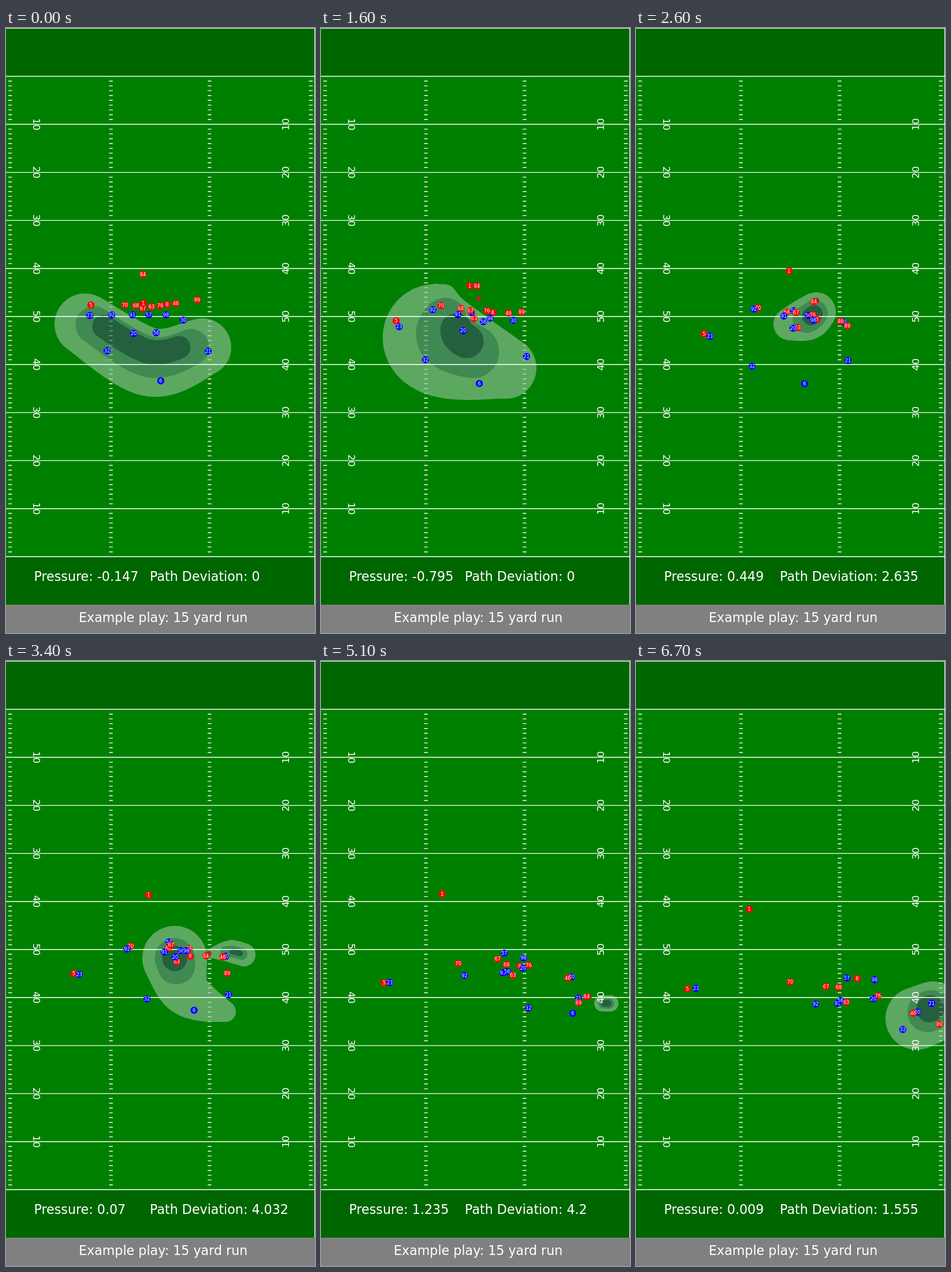
An HTML page that plays this animation: 535x1046 px, repeating every 6.8 s.

```html
<!DOCTYPE html>
<html lang="en">
<head>
<meta charset="utf-8">
<title>Example play</title>
<style>
  html, body { margin: 0; width: 100%; height: 100%; overflow: hidden; background: #006600; }
  svg { display: block; width: 100%; height: 100%; }
  text { font-family: "DejaVu Sans", sans-serif; fill: #fff; white-space: pre; }
  .caption { font-size: 22.2px; }
  .yards { font-size: 16.67px; text-anchor: middle; }
  .label { font-size: 8.33px; text-anchor: middle; }
</style>
</head>
<body>
<svg id="stage" viewBox="0 0 535 1046"></svg>
<script>
const LOOP = 6800, STEP = 100;
const RED = '#f00', BLUE = '#00f', WHITE = '#fff';
const stage = document.getElementById('stage');

function el(tag, attrs, parent = stage, text) {
  const node = document.createElementNS('http://www.w3.org/2000/svg', tag);
  for (const key in attrs) node.setAttribute(key, attrs[key]);
  if (text !== undefined) node.textContent = text;
  parent.appendChild(node);
  return node;
}
const rect = (y, height, fill) => el('rect', { x: 0, y, width: 535, height, fill });
const strokes = (d, width = 1.4) => el('path', { d, stroke: WHITE, 'stroke-width': width, fill: 'none' });
const caption = (x, y, text) => el('text', { class: 'caption', x, y }, stage, text);

// Field
const yardY = (yard) => 83.5 + 8.305 * yard;
rect(0, 997, '#006600');
rect(yardY(0), yardY(100) - yardY(0), '#008000');
rect(997, 49, '#808080');

let hashes = '', lines = '';
for (let yard = 0; yard <= 100; yard++) {
  if (yard % 10 === 0) lines += `M0 ${yardY(yard)}H535`;
  else for (const x of [4, 178.5, 349.3, 524.5]) hashes += `M${x} ${yardY(yard)}h6.3`;
}
strokes(hashes);
const density = el('g', { opacity: 0.6 });
strokes(lines);
strokes('M0 .5H534.5V997', 1);

for (let yard = 10; yard < 100; yard += 10) {
  const y = yardY(yard), value = Math.min(yard, 100 - yard);
  el('text', { class: 'yards', transform: `translate(47 ${y}) rotate(90)` }, stage, value);
  el('text', { class: 'yards', transform: `translate(490 ${y}) rotate(-90)` }, stage, value);
}

const pressureText = caption(48.5, 956, '');
const deviationText = caption(249, 956, '');
caption(126, 1026.5, 'Example play: 15 yard run');

// Interpolation
const mix = (a, b, u) => a + (b - a) * u;

function segment(times, t) {
  let i = 0;
  while (i < times.length - 2 && t >= times[i + 1]) i++;
  return [i, Math.min(1, Math.max(0, (t - times[i]) / (times[i + 1] - times[i])))];
}
function linear(times, values, t) {
  const [i, u] = segment(times, t);
  return mix(values[i], values[i + 1], u);
}
function hermite(a, b, slopeA, slopeB, u) {
  const v = 1 - u;
  return v * v * (1 + 2 * u) * a + u * u * (3 - 2 * u) * b + u * v * (v * slopeA - u * slopeB);
}

// Players run from rest through three more points, listed from back to front
const RUN = [0, 2600, 4300, 6700];
const movers = [];

function mover(color, radius, label, points) {
  const node = el('g', {});
  el('circle', { r: radius, fill: color }, node);
  if (label) el('text', { class: 'label', y: 3 }, node, label);
  movers.push({ node, points });
}
const offense = (label, ...points) => mover(RED, 6.2, label, points);
const defense = (label, ...points) => mover(BLUE, 6.2, label, points);

function position(points, t) {
  const [i, u] = segment(RUN, t);
  return [0, 1].map(axis => {
    const slope = (k) => {
      if (k === 0) return 0;
      const next = Math.min(k + 1, RUN.length - 1);
      return (points[next][axis] - points[k - 1][axis]) / (RUN[next] - RUN[k - 1]) * (RUN[i + 1] - RUN[i]);
    };
    return hermite(points[i][axis], points[i + 1][axis], slope(i), slope(i + 1), u);
  });
}

mover('#a52a2a', 4.5, '', [[237, 481], [313, 471], [407, 555], [588, 622]]);
offense(8, [279, 478], [313, 504], [328, 518], [383, 549]);
defense(57, [247, 496], [273, 489], [297, 489], [365, 548]);
defense(30, [307, 505], [359, 508], [408, 522], [487, 607]);
offense(70, [206, 479], [211, 484], [225, 508], [267, 555]);
offense(68, [225, 480], [261, 491], [305, 508], [351, 564]);
offense(67, [237, 485], [277, 492], [295, 497], [329, 563]);
offense(1, [238, 476], [265, 420], [220, 396], [196, 429]);
offense(63, [252, 482], [280, 518], [316, 525], [364, 590]);
defense(91, [219, 496], [256, 498], [297, 517], [349, 592]);
defense(56, [260, 527], [298, 497], [309, 516], [354, 587]);
offense(76, [267, 480], [306, 496], [334, 505], [419, 579]);
defense(98, [277, 496], [307, 505], [325, 500], [413, 551]);
defense(20, [221, 528], [272, 519], [321, 512], [411, 584]);
defense(92, [183, 496], [204, 486], [223, 521], [311, 593]);
offense(46, [294, 476], [354, 507], [402, 523], [480, 609]);
offense(5, [147, 479], [118, 529], [117, 550], [89, 567]);
defense(23, [145, 497], [128, 533], [125, 550], [104, 566]);
defense(32, [175, 558], [201, 585], [308, 586], [462, 637]);
defense(21, [350, 559], [367, 575], [415, 579], [512, 592]);
offense(89, [331, 470], [366, 515], [411, 570], [525, 628]);
defense(6, [268, 610], [292, 615], [381, 596], [555, 650]);
offense(84, [237, 426], [308, 473], [402, 555], [585, 622]);

// Density: discs strung along a spine of [x, y, radius]. Each higher level
// keeps the part of the spine around its peak, with smaller discs.
const DISCS = 80;
const levels = ['#99c3a2', '#699189', '#3c4b67'].map(fill => el('path', { fill }, density));

function along(spine, w) {
  const last = spine.length - 1;
  const i = Math.min(last - 1, Math.floor(w * last));
  const node = (k) => spine[Math.min(last, Math.max(0, k))];
  return [0, 1, 2].map(c => hermite(node(i)[c], node(i + 1)[c],
    (node(i + 1)[c] - node(i - 1)[c]) / 2, (node(i + 2)[c] - node(i)[c]) / 2, w * last - i));
}
function shape(time, spine, { peak = 0.5, spread = 0.5, shrink = 0.6, drift = [0, 0] } = {}) {
  const discs = levels.map((_, level) => Array.from({ length: DISCS + 1 }, (_, n) => {
    const w = peak + (n / DISCS - peak) * spread ** level;
    const [x, y, r] = along(spine, w);
    return [x + drift[0] * level, y + drift[1] * level, r * shrink ** level];
  }));
  return { time, discs };
}

const mainBody = [
  shape(0, [[137, 512, 53], [250, 578, 59], [340, 552, 50]],
    { peak: 0.4, spread: 0.75, drift: [0, -9] }),
  shape(1600, [[214, 463, 20], [195, 540, 87], [320, 588, 53]],
    { spread: 0.4, shrink: 0.58, drift: [22, -4] }),
  shape(2600, [[266, 512, 28], [296, 503, 37], [312, 491, 34]],
    { peak: 0.8, spread: 0.4, shrink: 0.65 }),
  shape(3400, [[292, 514, 56], [306, 565, 43], [335, 588, 34], [380, 606, 18]],
    { peak: 0, spread: 0.1, shrink: 0.62 }),
  shape(4300, [[312, 480, 21], [278, 520, 45], [305, 571, 43], [365, 597, 31],
    [420, 619, 18], [464, 598, 22], [436, 532, 27], [406, 566, 8]],
    { peak: 0.7, spread: 0.47 }),
  shape(5100, [[487, 592, 14], [501, 592, 14]], { spread: 0.64, shrink: 0.64 }),
  shape(6700, [[486, 618, 54], [514, 607, 53]],
    { peak: 1, spread: 0.3, shrink: 0.66, drift: [-2, -3] }),
];
const sideBody = [
  shape(2900, [[340, 500, 0], [340, 500, 0]]),
  shape(3400, [[355, 505, 8], [388, 502, 19], [412, 508, 20]], { peak: 0.75, shrink: 0.5 }),
  shape(4200, [[435, 540, 0], [435, 540, 0]]),
];

function discPath([x, y, r]) {
  return r > 0 ? `M${x - r} ${y}a${r} ${r} 0 1 1 ${2 * r} 0a${r} ${r} 0 1 1 ${-2 * r} 0` : '';
}
function bodyPath(body, level, t) {
  const [i, u] = segment(body.map(key => key.time), t);
  const next = body[i + 1].discs[level];
  return body[i].discs[level]
    .map((disc, n) => discPath(disc.map((value, c) => mix(value, next[n][c], u))))
    .join('');
}

// Counters
const TIMES = mainBody.map(key => key.time);
const pressureAt = (t) => linear(TIMES, [-0.147, -0.795, 0.449, 0.07, 0.075, 1.235, 0.009], t);
const deviationAt = (t) =>
  linear([0, 2000, ...TIMES.slice(2)], [0, 0, 2.635, 4.032, 2.222, 4.2, 1.555], t);

function render(t) {
  levels.forEach((path, level) =>
    path.setAttribute('d', bodyPath(mainBody, level, t) + bodyPath(sideBody, level, t)));
  for (const { node, points } of movers)
    node.setAttribute('transform', `translate(${position(points, t)})`);
  pressureText.textContent = 'Pressure: ' + +pressureAt(t).toFixed(3);
  deviationText.textContent = 'Path Deviation: ' + +deviationAt(t).toFixed(3);
}

const start = performance.now();
function tick() {
  const t = (performance.now() - start) % LOOP;
  render(Math.floor(t / STEP) * STEP);
  requestAnimationFrame(tick);
}
tick();
</script>
</body>
</html>
```
